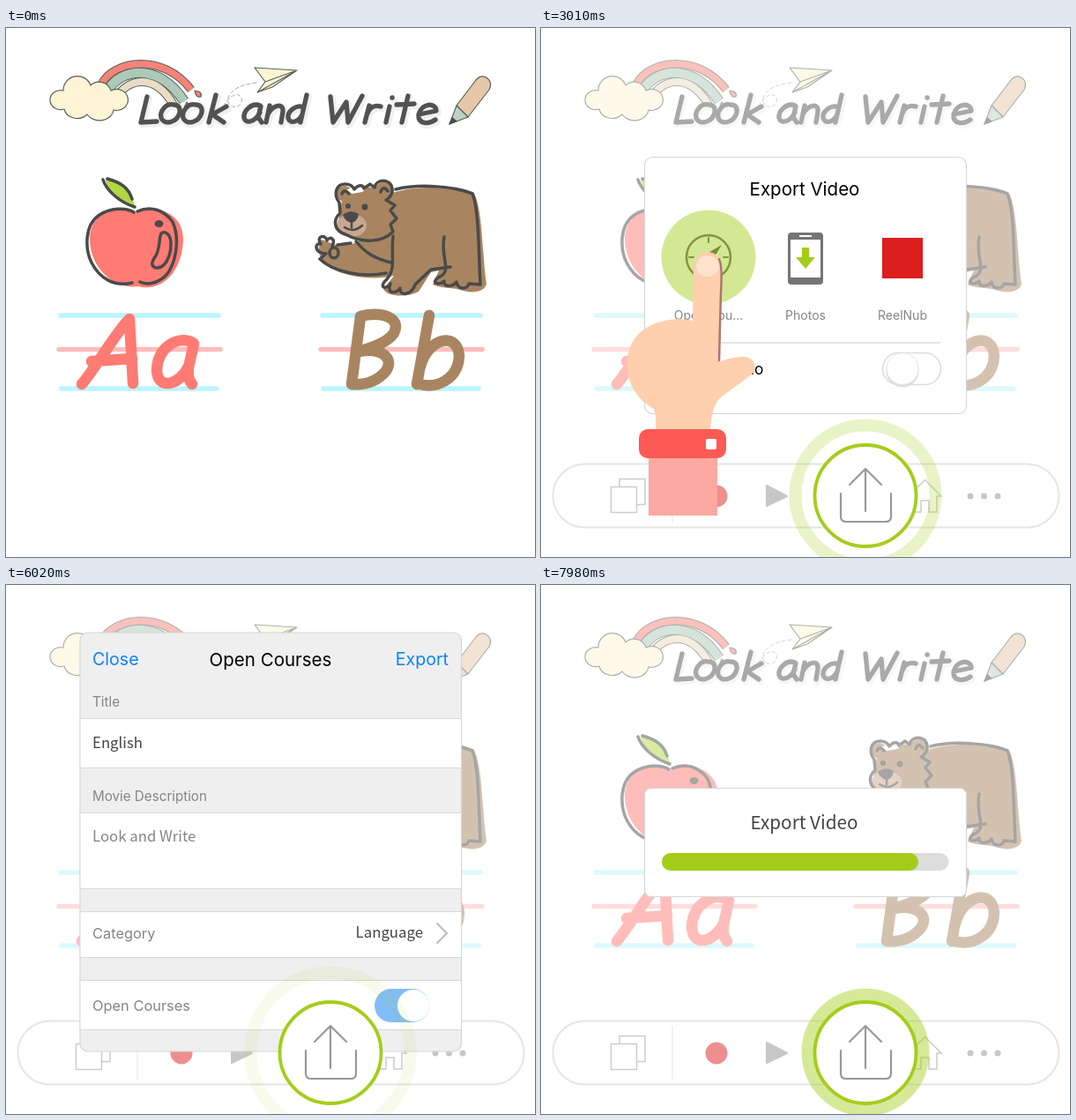
Recreate the animation shown at these times as an HTML page. Size 600x600 px, loop 8 s.

```html
<!DOCTYPE html>
<html lang="en">
<head>
<meta charset="utf-8">
<title>Export a lesson video</title>
<style>
html, body { margin: 0; width: 100%; height: 100%; overflow: hidden; background: #fff; }
svg { display: block; width: 100%; height: 100%; }
text { font-family: Inter, Roboto, sans-serif; font-size: 16.4px; fill: #858585; }
.alt { font-family: "Noto Sans CJK KR", "Noto Sans CJK JP", "Noto Sans CJK", "Noto Sans", sans-serif; font-size: 16.8px; }
.dark { fill: #444; }
.head { font-size: 20.5px; fill: #000; }
.link { font-size: 19.6px; fill: #0a84f5; }
.cap { font-size: 15.2px; }
.tag { font-size: 14px; }
.mid { text-anchor: middle; }
.end { text-anchor: end; }
.line { fill: none; stroke-linecap: round; stroke-linejoin: round; }
.ink { stroke: #4a4a4a; stroke-width: 3.5; }
.thin { stroke: #58635a; stroke-width: 1.2; stroke-linejoin: round; }
.box { stroke: #d6d6d6; stroke-width: 1.2; }

#toolbar, #button, #veil, #exportPanel, #coursePanel, #progressPanel, #firstHand, #secondHand, #bar {
  animation: 8s linear infinite both;
}
#toolbar { animation-name: rise; }
#button { animation-name: pop; transform-origin: 368px 530px; }
#veil { animation-name: pale; }
#exportPanel { animation-name: exportFade; }
#coursePanel { animation-name: courseFade; }
#progressPanel { animation-name: progressFade; }
#firstHand { animation-name: firstTap; }
#secondHand { animation-name: secondTap; }
#bar { animation-name: fill; }

@keyframes rise {
  0% { transform: translateY(110px); animation-timing-function: ease-out; }
  4.4%, 100% { transform: none; }
}
@keyframes pop {
  0%, 8.6% { opacity: 0; transform: scale(.5); animation-timing-function: ease-out; }
  10% { opacity: 1; }
  13.1% { transform: scale(1.5); animation-timing-function: ease-in-out; }
  17.5%, 100% { opacity: 1; transform: none; }
}
@keyframes pale { 0%, 19.2% { opacity: 0; } 22.7%, 100% { opacity: .5; } }
@keyframes exportFade { 0%, 19.2% { opacity: 0; } 22.7%, 42.8% { opacity: 1; } 42.9%, 100% { opacity: 0; } }
@keyframes courseFade { 0%, 40.2% { opacity: 0; } 42.8%, 86.6% { opacity: 1; } 88.4%, 100% { opacity: 0; } }
@keyframes progressFade { 0%, 87.5% { opacity: 0; } 89.3%, 100% { opacity: 1; } }
@keyframes firstTap {
  0%, 30.6% { opacity: 0; transform: translateY(50px); animation-timing-function: ease-out; }
  34.1%, 40.2% { opacity: 1; transform: none; }
  42%, 100% { opacity: 0; transform: none; }
}
@keyframes secondTap {
  0%, 76.2% { opacity: 0; transform: translateY(50px); animation-timing-function: ease-out; }
  79.6%, 85.8% { opacity: 1; transform: none; }
  87.5%, 100% { opacity: 0; transform: none; }
}
@keyframes fill { 0%, 90% { width: 0; } 99.75%, 100% { width: 291px; } }
</style>
</head>
<body>
<svg viewBox="0 0 600 600">
  <defs>
    <path id="o" d="M190 87C181 85 174 95 176 102C180 111 194 107 197 96C198 90 195 87 190 87Z"/>
    <g id="title">
      <path d="M160 78L153 107L171 106M238 76L230 107M250 89L234 98L247 107"/>
      <use href="#o"/><use href="#o" x="25"/>
      <path d="M288 88C279 84 269 94 270 102C272 109 282 107 288 96M289 89L286 101L290 107M299 88L295 107M297 98C303 87 315 84 314 95L312 107M341 76L334 107M337 90C329 86 319 95 320 102C322 110 333 106 336 98"/>
      <path d="M368 78L371 107L386 84L388 107L404 77M412 88L407 107M410 97C412 90 418 87 425 89M435 89L431 107M438 79h.1M456 77L449 107M443 87L463 86M468 98L488 94C488 84 471 85 468 98C467 110 480 109 487 104"/>
    </g>
    <path id="outerBow" d="M108 64C122 36 178 28 210 70"/>
    <path id="middleBow" d="M115 71C130 46 172 38 202 83"/>
    <path id="innerBow" d="M126 77C140 58 168 50 190 87"/>
    <g id="guides" class="line" stroke-width="5.500">
      <path stroke="#baf5ff" d="M62 326H241M63 409H239"/>
      <path stroke="#ffbcbc" d="M60 364.500H243"/>
    </g>
    <g id="share" class="line" stroke="#999">
      <path d="M368 548V500M350 518L368 500L386 518M340 528V554Q340 560 346 560H391Q397 560 397 554V528"/>
    </g>
    <g id="hand">
      <path fill="#fca9a2" d="M122 486H200V553H122Z"/>
      <path fill="#ffcfae" d="M173 270a16 16 0 0 1 32 0L203 378Q215 374 225 373C240 371 248 383 239 393L205 418Q193 427 192 458H130Q131 440 128 432C98 416 92 382 102 360C112 336 145 326 172 332Z"/>
      <path class="line" stroke="#a97870" stroke-width="2.500" d="M202 262Q206 270 204 300L202 377"/>
      <ellipse cx="189" cy="270" rx="13" ry="12" fill="#ffe3cd"/>
      <rect x="111" y="455" width="99" height="33" rx="10" fill="#fd5a55"/>
      <rect x="187" y="466" width="12" height="12" rx="2" fill="#fff"/>
    </g>
  </defs>

  <g id="scene">
    <g fill="none">
      <g stroke="#58635a">
        <use href="#outerBow" stroke-width="9.500"/><use href="#middleBow" stroke-width="12"/><use href="#innerBow" stroke-width="10"/>
      </g>
      <use href="#outerBow" stroke="#f6837a" stroke-width="7.500"/>
      <use href="#middleBow" stroke="#adc9b8" stroke-width="10"/>
      <use href="#innerBow" stroke="#ecdcc6" stroke-width="8"/>
    </g>
    <path class="thin" fill="#f6837a" d="M214 71Q223 72 221 78Q215 79 214 71Z"/>
    <path class="thin" fill="#adc9b8" d="M205 84Q212 92 205 98Q200 92 205 84Z"/>
    <path class="thin" fill="#fff4d6" d="M65 71A16 16 0 0 1 96 65A14 14 0 0 1 119 71A13 12 0 1 1 122 93A16 13 0 0 1 92 98A15 13 0 0 1 66 92A12 11 0 1 1 65 71Z"/>
    <path class="line" stroke="#aaa" stroke-dasharray="4 3" d="M284 62C265 64 250 72 252 84C256 94 270 89 267 79C262 70 250 80 245 92"/>
    <path class="thin" fill="#fdf6d5" d="M282 45L330 48L294 61ZM294 61L285 73L330 48M285 73L302 67L330 48"/>
    <path class="thin" fill="#e6c7aa" d="M511 88L533 59Q539 52 546 57Q552 62 548 70L524 101Z"/>
    <path class="thin" fill="#bfd0c5" d="M511 88L524 101L503 109Z"/>
    <path fill="#4a4a4a" d="M506 101L512 106L502 110Z"/>
    <g class="line" role="img" aria-label="Look and Write">
      <use href="#title" x="1.500" y="2" stroke="#f0f0f0" stroke-width="9"/>
      <use href="#title" stroke="#525252" stroke-width="5.300"/>
    </g>

    <g>
      <path fill="#ff7b73" d="M147 210C165 200 201 206 201 240C200 275 178 300 150 293C125 297 95 275 95 238C97 208 125 200 147 210Z"/>
      <path fill="#b1d741" d="M113 171C128 171 143 182 146 203C130 200 116 190 113 171Z"/>
      <path class="line ink" d="M145 209C136 203 118 204 106 212C88 224 90 252 97 266C106 284 123 294 143 289M149 208C165 201 180 207 189 220C198 240 192 268 182 280C172 290 160 292 152 288M115 171C130 175 139 181 143 194M110 172C114 185 130 198 146 203"/>
      <path class="line ink" d="M176 233C180 230 187 233 187 245C187 260 180 273 170 272C163 270 166 264 170 258C175 250 173 240 176 233Z"/>
      <ellipse cx="173.500" cy="222" rx="5" ry="4" fill="#4a4a4a"/>
    </g>

    <g>
      <path fill="#a88560" d="M437 188C455 179 500 179 530 186C541 202 540 262 545 290C543 299 530 302 515 297C506 294 496 296 484 291L491 275L482 277L468 299C455 306 432 305 428 296L440 281C420 286 382 284 362 268C354 260 353 248 358 240L374 246L393 245L420 232Z"/>
      <circle cx="384" cy="188" r="9" fill="#a88560"/><circle cx="429" cy="186" r="11" fill="#a88560"/>
      <path fill="#a88560" d="M380 200C385 180 425 174 436 190C446 210 442 224 437 234C420 245 388 240 376 228Z"/>
      <path fill="#fff" d="M386 184C394 179 405 178 413 179L404 186L392 188Z"/>
      <ellipse cx="392" cy="224" rx="17" ry="13" fill="#c9a78f"/>
      <path class="line ink" d="M378 198C371 189 374 177 385 177Q392 177 395 183C400 177 405 178 406 182L413 177L418 181C420 171 436 170 438 182C439 188 435 193 431 195L441 201L436 207L443 216L436 223L439 231C426 244 404 244 385 234C372 230 370 218 379 210L378 198M381 188Q384 182 389 188M425 186Q428 178 433 185"/>
      <path fill="#4a4a4a" d="M382 212Q391 205 400 211Q399 219 392 221Q385 220 382 212Z"/>
      <circle cx="388" cy="202" r="3" fill="#4a4a4a"/><circle cx="407" cy="203" r="3.500" fill="#4a4a4a"/>
      <path class="line ink" style="stroke-width:2.500" d="M392 220V226M384 226Q394 233 404 224"/>
      <path class="line ink" d="M442 183C470 176 510 180 529 188C537 206 536 262 538 290M439 236C436 260 444 274 429 288C423 297 435 295 436 290C431 303 444 301 447 295C446 305 460 303 464 291L482 274L504 271M497 237C492 262 508 276 490 283C481 290 492 292 497 287C496 295 508 293 511 288C513 298 524 296 525 290L538 291M397 242C408 256 420 262 437 266M356 262C370 276 404 284 431 278M376 246L391 244M356 262L363 256C349 255 350 243 357 245C351 235 363 234 364 241C368 235 374 240 370 247"/>
      <ellipse class="line ink" cx="372" cy="255" rx="5" ry="6"/>
    </g>

    <use href="#guides"/><use href="#guides" x="297"/>
    <g class="line" stroke-width="12.500">
      <path stroke="#ff7b73" d="M86 404C105 380 125 345 140 330L144 403M97 378L143 375M212 357C195 348 172 362 171 388C172 411 196 406 207 384M213 358L207 385C206 395 208 401 211 404"/>
      <path stroke="#a88560" d="M402 328L392 404M402 327C425 321 449 328 440 346C432 358 412 363 400 367C425 362 441 374 431 389C420 402 405 405 392 404M480 326L466 404M470 384C478 352 512 343 514 372C513 398 488 411 466 403"/>
    </g>
  </g>

  <g id="toolbar">
    <rect x="13.500" y="494.500" width="574" height="72" rx="36" fill="#fff" stroke="#ccc" stroke-width="2"/>
    <g fill="#fff" stroke="#999" stroke-width="1.500">
      <rect x="89" y="511.500" width="29" height="29"/><rect x="79.500" y="520.500" width="29" height="29"/>
      <path fill="none" d="M417 531L435.500 512.500L454 531H449V549H440V536H431V549H422V531Z"/>
    </g>
    <path stroke="#ddd" stroke-width="1.500" d="M149 500V561"/>
    <circle cx="199" cy="531" r="12.500" fill="#dc1e1e"/>
    <path class="line" style="fill:#909090" stroke="#909090" stroke-width="2" d="M256 519L279 531L256 542Z"/>
    <use href="#share" transform="translate(184 265.500) scale(.5)" stroke-width="3"/>
    <g fill="#909090"><circle cx="487" cy="531" r="3.500"/><circle cx="502.500" cy="531" r="3.500"/><circle cx="518" cy="531" r="3.500"/></g>
  </g>

  <rect id="veil" width="600" height="600" fill="#fff"/>

  <g id="exportPanel">
    <rect class="box" x="117.500" y="146.500" width="365" height="291" rx="9" fill="#fff"/>
    <text class="head mid" x="299" y="190">Export Video</text>
    <circle cx="190" cy="260" r="25" fill="none" stroke="#666" stroke-width="2.500"/>
    <path class="line" stroke="#666" stroke-width="2" d="M190 238v5M190 277v5M168 260h5M207 260h5"/>
    <path fill="#555" d="M205 246L194 264L186 257ZM175 274L186 257L194 264Z"/>
    <rect x="280" y="232" width="40" height="59" rx="4" fill="#747474"/>
    <path fill="#fff" d="M283 240H317V283H283ZM293 235H307V237H293Z"/>
    <path fill="#a4cd1a" d="M296 249h8v11h7l-11 13l-11-13h7z"/>
    <rect x="387" y="238" width="46" height="46" fill="#dc1e1e"/>
    <g class="mid">
      <text class="tag" x="190" y="331">Open Cou...</text>
      <text class="tag" x="300" y="331">Photos</text>
      <text class="tag" x="410" y="331">ReelNub</text>
    </g>
    <path stroke="#ccc" d="M147 357H453"/>
    <text x="147" y="392.500" style="font-size:17.300px;fill:#000">Export Audio</text>
    <rect x="387.500" y="368.500" width="66" height="36" rx="18" fill="#fff" stroke="#ddd" stroke-width="1.500"/>
    <circle cx="410" cy="389" r="18.500" fill="#ddd"/>
    <circle cx="410" cy="386.500" r="18" fill="#fff" stroke="#ddd" stroke-width=".8"/>
  </g>

  <g id="coursePanel">
    <rect class="box" x="84" y="54" width="432.500" height="475" rx="9" fill="#efefef"/>
    <path fill="#fff" stroke="#d8d8d8" d="M84 151.500H516.500V207.500H84ZM84 258.500H516.500V344.500H84ZM84 370.500H516.500V422.500H84ZM84 448.500H516.500V504.500H84Z"/>
    <text class="link" x="98" y="91">Close</text>
    <text class="head mid" x="300" y="92">Open Courses</text>
    <text class="link end" x="502" y="91">Export</text>
    <text class="cap" x="98" y="138">Title</text>
    <text id="name" class="dark" x="98" y="185">Project</text>
    <text class="cap" x="98" y="245">Movie Description</text>
    <text id="about" x="98" y="291">Video made with Tarn Capturer</text>
    <text x="98" y="401">Category</text>
    <text class="alt dark end" x="473" y="400">Language</text>
    <path class="line" stroke="#bbb" stroke-width="2" d="M489 384L500 395L489 406"/>
    <text x="98" y="483">Open Courses</text>
    <rect x="418" y="458" width="62" height="38" rx="19" fill="#82bdf7"/>
    <circle cx="462" cy="477" r="18" fill="#fff"/>
  </g>

  <g id="progressPanel">
    <rect class="box" x="117.500" y="230.500" width="365" height="123" rx="7" fill="#fff"/>
    <text class="alt dark mid" x="298.500" y="277" style="font-size:20.700px">Export Video</text>
    <rect x="137" y="304" width="325.500" height="20" rx="10" fill="#dcdcdc"/>
    <rect id="bar" x="137" y="304" height="20" rx="10" fill="#a4cd1a"/>
  </g>

  <circle id="halo" cx="368" cy="530" fill="none" stroke="#a4cd1a" stroke-width="14"/>
  <g id="button">
    <circle cx="368" cy="530.500" r="57.500" fill="#fff" stroke="#a4cd1a" stroke-width="3.800"/>
    <use href="#share" stroke-width="2.200"/>
  </g>
  <circle id="firstRipple" cx="190" cy="260" fill="#a4cd1a"/>
  <circle id="secondRipple" cx="467" cy="91" fill="#a4cd1a"/>
  <g id="firstHand"><use href="#hand"/></g>
  <g id="secondHand"><use href="#hand" x="280" y="-173"/></g>
</svg>
<script>
const LOOP = 8000, PULSE = 866;
const byId = id => document.getElementById(id);
const easeOut = u => 1 - (1 - u) ** 2;
const clock = byId('veil').getAnimations()[0];

function setCircle(id, radius, opacity) {
  byId(id).setAttribute('r', radius);
  byId(id).setAttribute('opacity', opacity);
}

function pulse(t) {
  const p = easeOut(t % PULSE / PULSE);
  setCircle('halo', 51 + 40 * p, t < 2 * PULSE ? 0 : 0.08 + 0.57 * (1 - p));
}

function ripple(id, t, start) {
  const u = (t - start) / 600;
  const active = u > 0 && u < 1;
  setCircle(id, active ? 110 * easeOut(u) : 0, active ? 0.65 * (1 - u) : 0);
}

// Erases the old words from the end, then types the new ones.
function retype(id, t, { before, after, eraseAt, eraseStep, typeAt, typeStep }) {
  const typing = t >= typeAt;
  const erased = Math.max(0, Math.floor((t - eraseAt) / eraseStep));
  byId(id).textContent = typing
    ? after.slice(0, 1 + Math.floor((t - typeAt) / typeStep))
    : before.slice(0, Math.max(0, before.length - erased));
  byId(id).classList.toggle('alt', typing);
}

const nameEdit = { before: 'Project', after: 'English', eraseAt: 4000, eraseStep: 50, typeAt: 4410, typeStep: 65 };
const aboutEdit = {
  before: 'Video made with Tarn Capturer', after: 'Look and Write',
  eraseAt: 4970, eraseStep: 12, typeAt: 5400, typeStep: 45
};

function draw() {
  const t = (clock.currentTime || 0) % LOOP;
  pulse(t);
  ripple('firstRipple', t, 2830);
  ripple('secondRipple', t, 6414);
  retype('name', t, nameEdit);
  retype('about', t, aboutEdit);
  requestAnimationFrame(draw);
}
draw();
</script>
</body>
</html>
```
